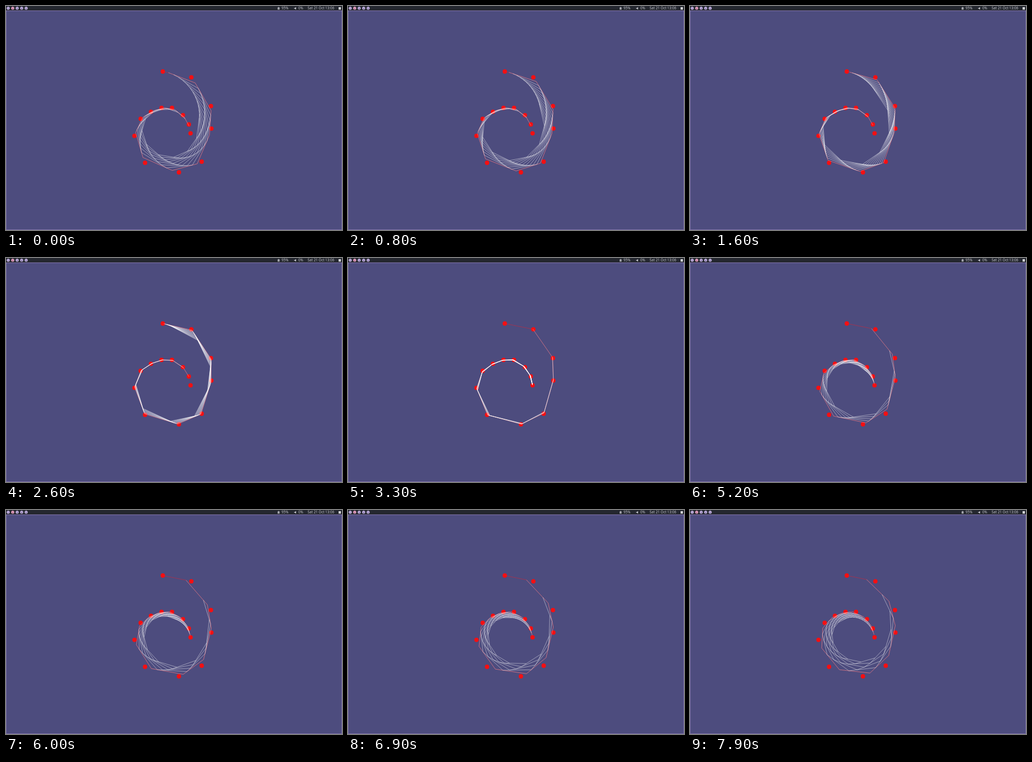
Recreate the animation shown at these times as an HTML page with a canvas. Size 600 by 400 pixels, loop 8 s.

```html
<!DOCTYPE html>
<html lang="en">
<head>
<meta charset="utf-8">
<title>De Casteljau spiral</title>
<style>
  html, body { margin: 0; width: 100%; height: 100%; overflow: hidden; background: #4d4c7e; }
  svg, canvas { position: absolute; left: 0; top: 0; width: 600px; height: 400px; }
  text { font-family: "Noto Sans", "Open Sans", sans-serif; font-size: 6.3px; fill: #c3c4ca; }
  .tag { font-size: 4px; fill: #33304a; text-anchor: middle; }
</style>
</head>
<body>
<svg viewBox="0 0 600 400">
  <rect width="600" height="400" fill="#4d4c7e"/>
  <rect x=".25" y="8.4" width="599.5" height="391.2" fill="none" stroke="#a58fc8" stroke-width=".6"/>
  <rect width="600" height="8" fill="#24272f"/>
  <g fill="#c5b3e6">
    <circle cx="4" cy="4" r="2.7"/>
    <circle cx="12" cy="4" r="2.7" fill="#f0a3c4"/>
    <circle cx="20" cy="4" r="2.7"/>
    <circle cx="28" cy="4" r="2.7"/>
    <circle cx="36" cy="4" r="2.7"/>
  </g>
  <g>
    <text class="tag" x="4" y="5.5">1</text>
    <text class="tag" x="12" y="5.5">2</text>
    <text class="tag" x="20" y="5.5">3</text>
    <text class="tag" x="28" y="5.5">4</text>
    <text class="tag" x="36" y="5.5">5</text>
  </g>
  <g fill="#c3c4ca">
    <path d="M485 2.5h3.6v4h-3.6zM486 1.7h1.6v.8h-1.6z" opacity=".8"/>
    <path d="M514.6 3.4h1.4l2-1.6v4.8l-2-1.6h-1.4z"/>
    <path d="M594 2h1.8v4.4H594zM596.2 2h1.8v4.4h-1.8z" fill="#eeeef2"/>
  </g>
  <text x="492" y="6.3">95%</text>
  <text x="522" y="6.3">0%</text>
  <text x="538.5" y="6.3">Sat 21 Oct 13:06</text>
</svg>
<canvas id="stage"></canvas>
<script>
const LOOP = 8000, STEP = 100;
const WRAP = 3080;       // time at which the parameter falls from 0 back to 1
const RATE = 0.0000637;  // parameter change per ms

const control = [
  [280, 117], [331, 127.3], [366, 178.7], [366.8, 218.8], [349.5, 278],
  [308.8, 297], [248.3, 280], [229.4, 231.8], [240.5, 201.5], [258.8, 188.8],
  [277.7, 182], [296.4, 182], [316, 194.8], [326.5, 211.5], [329.6, 227.3]
];

const canvas = document.getElementById("stage");
const ctx = canvas.getContext("2d");
const scale = window.devicePixelRatio || 1;
canvas.width = 600 * scale;
canvas.height = 400 * scale;
ctx.scale(scale, scale);

function polyline(points, color, width) {
  ctx.beginPath();
  points.forEach(([x, y]) => ctx.lineTo(x, y));
  ctx.strokeStyle = color;
  ctx.lineWidth = width;
  ctx.stroke();
}

function reduce(points, t) {
  return points.slice(1).map(([x, y], i) => {
    const [px, py] = points[i];
    return [px + (x - px) * t, py + (y - py) * t];
  });
}

function draw(ms) {
  const raw = (WRAP - ms) * RATE;
  const t = raw < 0 ? raw + 1 : raw;
  ctx.clearRect(0, 0, 600, 400);

  ctx.fillStyle = "#f50f12";
  for (const [x, y] of control) {
    ctx.beginPath();
    ctx.arc(x, y, 3.9, 0, Math.PI * 2);
    ctx.fill();
  }

  let level = reduce(control, t);
  polyline([control[0], ...level], "rgba(255, 25, 35, .9)", 0.5);
  polyline(level, "rgba(255, 255, 255, .75)", 0.4);
  while (level.length > 2) {
    level = reduce(level, t);
    polyline(level, "rgba(255, 255, 255, .95)", 0.48);
  }
}

const start = performance.now();
function tick() {
  const ms = (performance.now() - start) % LOOP;
  draw(Math.floor(ms / STEP) * STEP);
  requestAnimationFrame(tick);
}
tick();
</script>
</body>
</html>
```
